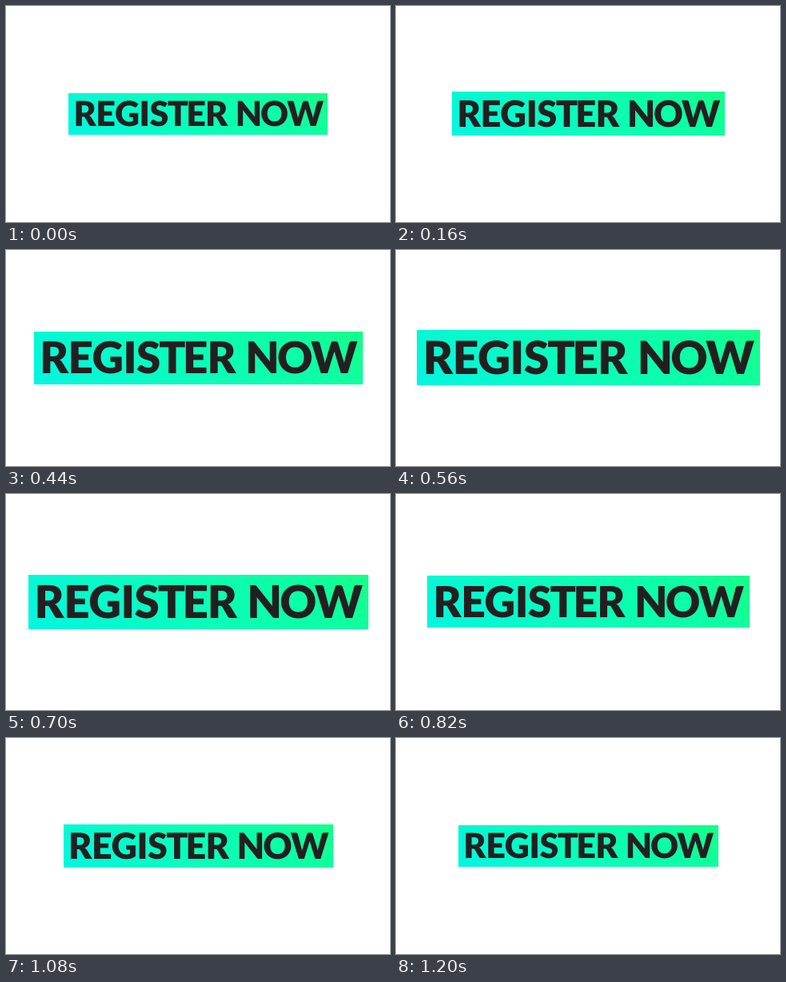
An HTML page for the animation above (1.26 s loop, 480x270 px).

```html
<!DOCTYPE html>
<html lang="en">
<head>
<meta charset="utf-8">
<title>Register now</title>
<style>
  html, body { margin: 0; width: 100%; height: 100%; overflow: hidden; background: #fff; }
  svg { display: block; width: 100vw; height: 100vh; }
  text {
    font: 900 43px Lato, "Open Sans", sans-serif;
    letter-spacing: -0.4px;
    fill: #231f20;
    text-rendering: geometricPrecision;
  }
</style>
</head>
<body>
<svg viewBox="0 0 480 270">
  <defs>
    <linearGradient id="mint" gradientUnits="userSpaceOnUse" x1="-94" y1="94" x2="94" y2="-94">
      <stop offset="0" stop-color="#04f5e0"/>
      <stop offset="0.5" stop-color="#0bfdb6"/>
      <stop offset="0.8" stop-color="#0dfea4"/>
      <stop offset="1" stop-color="#16ff88"/>
    </linearGradient>
  </defs>
  <g id="banner">
    <rect x="-162" y="-26.1" width="324" height="52.2" fill="url(#mint)" shape-rendering="crispEdges"/>
    <text x="-156" y="15" dx="0 0 0 0 0 -1.2 -2.4 -0.3">REGISTER</text>
    <text x="156.2" y="15" dx="0 -1.7 -0.6" text-anchor="end">NOW</text>
  </g>
</svg>
<script>
  const LOOP = 1260, STEP = 20, LAST = 1200, PULSE = 1220, GROWTH = 107 / 324;
  const banner = document.getElementById("banner");

  // One cosine pulse in 20 ms steps, with a short hold at the end.
  function draw(ms) {
    const t = Math.min(Math.floor((ms % LOOP) / STEP) * STEP, LAST);
    const swell = (1 - Math.cos(2 * Math.PI * t / PULSE)) / 2;
    const scale = 1 + GROWTH * swell;
    banner.setAttribute("transform", `translate(240.4 134.9) scale(${scale.toFixed(4)})`);
  }

  function tick() {
    draw(performance.now());
    requestAnimationFrame(tick);
  }
  tick();
</script>
</body>
</html>
```
